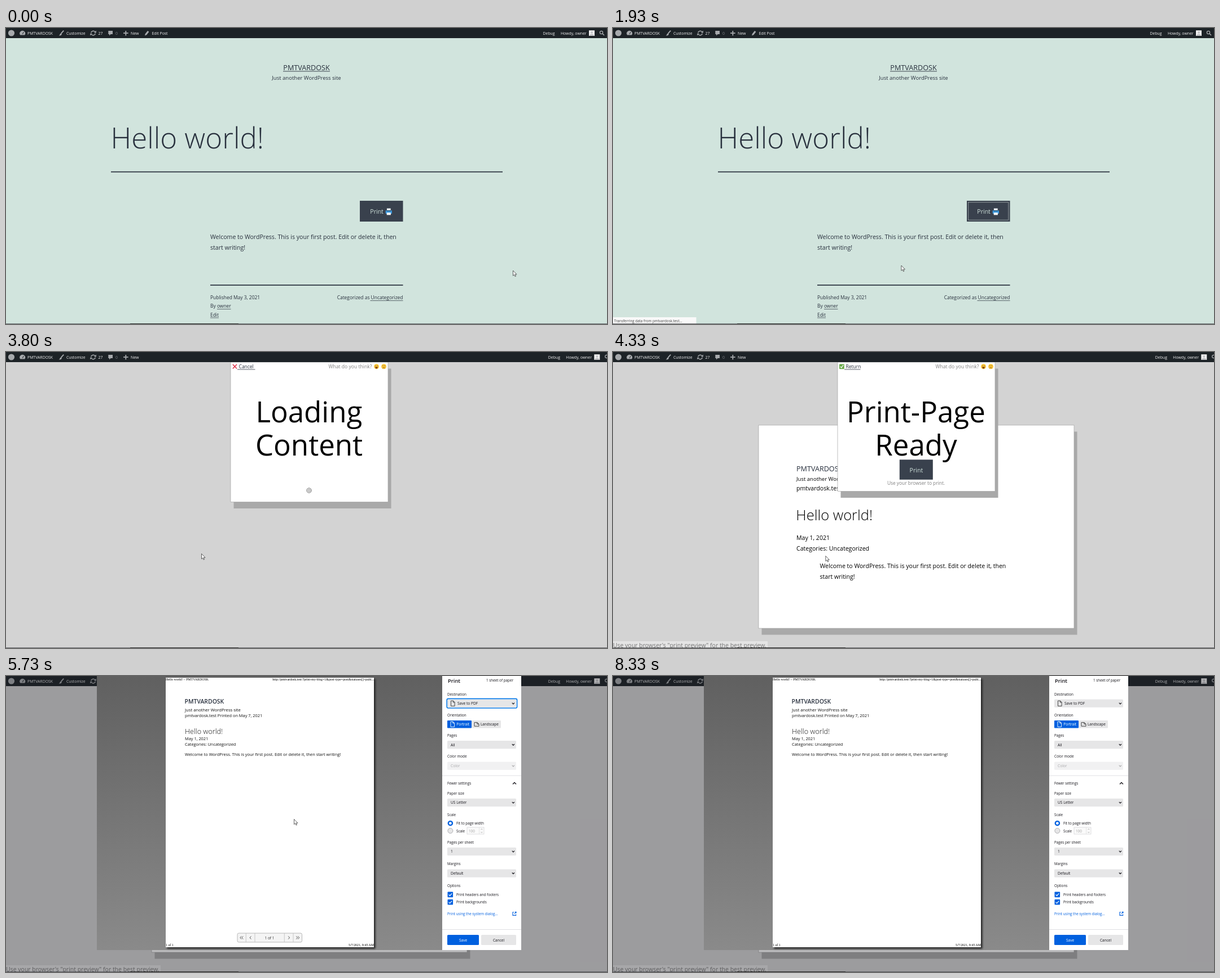
Recreate the animation shown at these times as an HTML page. Size 1065 by 526 pixels, loop 8.39 s.

```html
<!DOCTYPE html>
<html lang="en">
<head>
<meta charset="utf-8">
<title>Print preview demo</title>
<style>
html, body { margin: 0; width: 100%; height: 100%; overflow: hidden; background: #d3d3d3; }
svg { display: block; width: 1065px; height: 526px; font-family: "Open Sans", "Noto Sans", sans-serif; }
text { white-space: pre; }
</style>
</head>
<body>
<svg id="stage" viewBox="0 0 1065 526"></svg>
<script>
const LOOP = 8390;
const SITE = 'PMTVARDOSK', HOST = 'pmtvardosk.test', USER = 'owner';
const INK = '#28303d', BTN = '#39414d', MINT = '#d1e4dd', BLUE = '#0060df', DARK = '#15141a';
const WELCOME = 'Welcome to WordPress. This is your first post. Edit or delete it, then';
const BIG = 51, BODY = 10.57, SMALL = 8.45;

const text = (x, y, size, str, fill = INK, extra = '') =>
  `<text x="${x}" y="${y}" font-size="${size}" fill="${fill}" ${extra}>${str.replace(/&/g, '&amp;')}</text>`;
const rect = (x, y, w, h, fill, extra = '') =>
  `<rect x="${x}" y="${y}" width="${w}" height="${h}" fill="${fill}" ${extra}/>`;
const circle = (x, y, r, fill, extra = '') => `<circle cx="${x}" cy="${y}" r="${r}" fill="${fill}" ${extra}/>`;
const line = (d, color, width = 1, extra = '') =>
  `<path d="${d}" fill="none" stroke="${color}" stroke-width="${width}" ${extra}/>`;
const shape = (d, fill, extra = '') => `<path d="${d}" fill="${fill}" ${extra}/>`;
const group = (id, body, extra = '') => `<g ${id ? `id="${id}"` : ''} ${extra}>${body}</g>`;
const MID = 'text-anchor="middle"', END = 'text-anchor="end"', LIGHT = 'font-weight="300"';

// Top bar
const barText = (x, str, fill = '#f0f0f1') => text(x, 12.3, 6.9, str, fill);
const GREY = '#a7aaad';

function barLeft() {
  return rect(0, 0, 1065, 18, '#1d2327') +
    circle(9.5, 9, 5.6, GREY) +
    shape('M25.2 12.6A4.9 4.9 0 1 1 33.2 12.6Z', GREY) + line('M29.2 11L31.3 7', '#1d2327', 1) +
    barText(38, SITE) +
    line('M97.5 9.8L102.2 4.6', GREY, 1.8) + shape('M93.5 13.6Q95.5 13 95.7 10.6L97.6 9.6L98.9 11Q98 13.8 93.5 13.6Z', GREY) +
    barText(107, 'Customize') +
    line('M150.6 8.4A4 4 0 0 1 157.6 6.8M158.4 9.8A4 4 0 0 1 151.4 11.4', GREY, 1.5) +
    shape('M156 8.4H159.8V4.6ZM153 9.8H149.2V13.6Z', GREY) +
    barText(163.5, '27') +
    shape('M181.3 5H189V11H185.6L183 13.6V11H181.3Z', GREY) + barText(194, '0', '#80858a') +
    line('M212.3 5V13.4M208 9.2H216.6', GREY, 1.8) + barText(221, 'New');
}

function barRight(search) {
  return barText(951.5, 'Debug') + barText(983, 'Howdy, ' + USER) +
    rect(1033, 4.2, 10, 9.8, '#f1f1f1') +
    group('', circle(1038, 7.8, 1.9, '#c3c4c7') + shape('M1034 14Q1034 10.4 1038 10.4Q1042 10.4 1042 14Z', '#c3c4c7'),
      search ? '' : 'class="loaded"') +
    circle(1055, 8, 2.6, 'none', `stroke="${GREY}" stroke-width="1.3"`) + line('M1057 10L1060 13', GREY, 1.6);
}

// Printer icon on the print button
function printer(x, y) {
  return rect(x - 3.4, y - 6, 6.8, 5, '#e8eef2') + rect(x - 5.6, y - 2.6, 11.2, 6, '#3f9be0', 'rx="1"') +
    rect(x - 4, y - 2.6, 8, 1.6, '#25597f') + rect(x - 3.6, y + 1.6, 7.2, 4.2, '#f7f7f7');
}

function button(id, x, y, w, h, labelX, icon = '') {
  return group(id, rect(x, y, w, h, BTN, 'class="face"') + text(labelX, y + 23, BODY, 'Print', MINT, 'class="label"') + icon +
    rect(x + 2.7, y + 2.7, w - 5.4, h - 5.4, 'none', 'class="focus" stroke-width="1" stroke-dasharray="1 1"'));
}

const status = (id, str) => group(id, rect(0, 514, 147.5, 11.5, '#f9f9f9') + text(2, 522.6, 6.3, str, '#444'));

function blogPage() {
  return rect(0, 0, 1065, 526, MINT) + barLeft() +
    shape('M246 13.4L246.7 10.6L251 5L253.4 6.8L249.2 12.3Z', GREY) + barText(258.5, 'Edit Post') + barRight(true) +
    text(532.5, 75, 12.6, SITE, INK, MID) + rect(491, 76.5, 83, .9, INK) +
    text(532.5, 92, 9.52, 'Just another WordPress site', INK, MID) +
    text(185.5, 214, BIG, 'Hello world!', INK, LIGHT) +
    rect(186, 254.8, 694, 1.7, INK) +
    button('blogBtn', 627, 307, 76.5, 37, 645.3, printer(678.3, 326.5)) +
    text(362, 375, BODY, WELCOME) + text(362, 394.3, BODY, 'start writing!') +
    rect(362, 456, 341.5, 1.7, INK) +
    text(362, 482, SMALL, 'Published May 3, 2021') +
    text(362, 497.4, SMALL, 'By ' + USER) + rect(374, 499, 24.5, .7, INK) +
    text(362, 512.8, SMALL, 'Edit') + rect(362, 514.6, 15, .7, INK) +
    text(703.5, 482, SMALL, 'Categorized as Uncategorized', INK, END) + rect(645.5, 484, 58, .7, INK) +
    status('transfer', `Transferring data from ${HOST}...`);
}

// White card with a hard offset shadow
const card = (x, y, w, h) => rect(x + 5.5, y + 11.5, w, h, '#a9a9a9') +
  rect(x, y, w, h, '#fff', 'stroke="#a3a3a3" stroke-width=".7"');

const face = (x, mouth) => circle(x, 25.8, 4.5, '#fcc83c') + circle(x - 1.5, 24.6, .7, '#5d3c12') +
  circle(x + 1.5, 24.6, .7, '#5d3c12') + mouth;

function modalHead(action, end) {
  return text(412.6, 29.2, SMALL, action) + rect(410, 30.6, end - 410, .8, INK) +
    text(571.5, 29.2, 8.6, 'What do you think?', '#808080');
}
const faces = () =>
  face(656.5, shape('M654 26.6H659Q658.6 29.4 656.5 29.4Q654.4 29.4 654 26.6Z', '#7a3b12')) +
  face(669.5, line('M667.4 28.6Q669.5 26.4 671.6 28.6', '#7a4a12', .9));

const headline = (y, str) => text(537, y, BIG, str, '#000', MID);

function spinner(y) {
  return `<g transform="translate(537 ${y})">` +
    circle(0, 0, 4.3, '#e4e4e4', 'stroke="#888" stroke-width="1"') +
    circle(0, 0, 2, 'none', 'stroke="#999" stroke-width=".9"') +
    group('', circle(0, 2.4, 1.1, '#fff', 'stroke="#888" stroke-width=".5"'), 'class="spin"') + '</g>';
}

function waitPage() {
  const cross = line('M401.8 22L409 29.4M409 22L401.8 29.4', '#dd2e44', 1.5);
  const partial = circle(406, 26.3, 1.7, '#c8323e') +
    line('M655.3 28L658.6 24.6M668 28L671.3 24.6', '#e0a030', 1.7) +
    line('M657 27.6L659 25.8M669.8 27.6L671.6 25.8', '#6b4a18', .8);
  return group('init', card(398, 18, 279, 190) + headline(125, 'Initializing') + spinner(187)) +
    group('load', card(398, 18, 279, 248.5) + headline(125, 'Loading') + headline(184, 'Content') + spinner(246)) +
    modalHead('Cancel', 441.5) + group('partial', partial) + group('', cross + faces(), 'class="loaded"') +
    status('reading', 'Read s.w.org');
}

function readyPage() {
  return card(258, 130, 559, 361) +
    text(325, 212.3, 12.6, SITE) +
    text(325, 229, 9.52, 'Just another WordPress site', '#000') +
    text(325, 246.3, BODY, HOST + ' Printed on', '#000') +
    text(324.3, 299.3, 25.5, 'Hello world!', '#000', LIGHT) +
    text(325, 334, BODY, 'May 1, 2021', '#000') + text(325, 353.3, BODY, 'Categories: Uncategorized', '#000') +
    text(366.5, 383.6, BODY, WELCOME, '#000') + text(366.5, 402.6, BODY, 'start writing!', '#000') +
    card(398, 18, 279, 229.5) + modalHead('Return', 438.5) + faces() +
    rect(401, 21.4, 8.8, 8.8, '#6aab4c', 'rx="1"') + line('M402.8 25.8L404.8 28L408.2 23', '#fff', 1.3) +
    headline(125, 'Print-Page') + headline(184, 'Ready') +
    button('readyBtn', 507.8, 191.3, 59, 35.5, 525.6) +
    text(537, 236, 8.4, 'Use your browser to print.', '#808080', MID) +
    rect(0, 514, 274, 12, '#e4e4e4') +
    text(0, 524.6, 10.5, 'Use your browser\'s "print preview" for the best preview.', '#777');
}

// Browser print dialog
const label = (x, y, str, fill = DARK) => text(x, y, 6.3, str, fill);

function select(y, str, x = 788, off = false) {
  const color = off ? '#a9a9ab' : DARK;
  return rect(782, y, 122, 14.2, off ? '#f1f1f2' : '#e6e6e7', 'rx="1.5"') + text(x, y + 9.6, 6.6, str, color) +
    line(`M896.8 ${y + 6}L898.9 ${y + 8.2}L901 ${y + 6}`, color, 1.2);
}
const check = (y, str) => rect(782.5, y, 9.6, 9.6, BLUE, 'rx="1"') +
  line(`M784.6 ${y + 4.8}L786.6 ${y + 6.9}L790.2 ${y + 2.7}`, '#fff', 1.2) + label(798, y + 7.2, str);
const doc = (x, y, color) => line(`M${x} ${y}h4l2.6 2.6v6.8h-6.6zM${x + 3.8} ${y}v2.8h2.8`, color, .9);

function paper() {
  const p = (y, str, size = 7.4, extra = '') => text(317, y, size, str, '#111', extra);
  const edge = (x, y, str, extra = '') =>
    text(x, y, 5.9, str, '#000', `font-family="Liberation Serif, serif" ${extra}`);
  return rect(283, 3, 369, 479, '#fff', 'filter="url(#drop)"') +
    edge(283, 8, `Hello world! – ${SITE}`) +
    edge(652, 8, `http://${HOST}/?print-my-blog=1&post-type=post&statuses[]=publ...`, END) +
    text(316.6, 48.6, 10.4, SITE, INK, 'font-weight="600"') +
    p(62.6, 'Just another WordPress site', 7.7) + p(72.8, HOST + ' Printed on May 7, 2021') +
    p(103, 'Hello world!', 12.6, LIGHT) + p(113.6, 'May 1, 2021') + p(123.8, 'Categories: Uncategorized') +
    p(141.8, WELCOME + ' start writing!') +
    edge(283, 480, '1 of 1') + edge(652, 480, '5/7/2021, 9:45 AM', END);
}

function pager() {
  const arrow = (x, dir) => `M${x} 462.4l${dir * 2.4} 2.6l${-dir * 2.4} 2.6`;
  return rect(410, 457, 114.5, 16, '#f4f4f4', 'rx="2.5" stroke="#a8a8a8" stroke-width=".8"') +
    line('M425.3 457V473M441 457V473M493.3 457V473M509 457V473', '#bdbdbd', .8) +
    line([arrow(417.2, -1), arrow(420.2, -1), arrow(434.4, -1), arrow(500.2, 1), arrow(514.3, 1), arrow(517.3, 1)].join(''), '#444', .9) +
    text(467, 467.5, 6.5, '1 of 1', '#333', MID);
}

function dialog() {
  return rect(0, 0, 1065, 526, 'rgba(28,27,34,.3)') +
    rect(161, 0, 612, 487, 'url(#desk)') + paper() + group('pager', pager()) +
    rect(773, 0, 140, 487, '#fff') +
    text(783, 11.6, 9.4, 'Print', DARK, 'font-weight="600"') +
    text(899, 10.4, 6.3, '1 sheet of paper', DARK, END) +
    label(782, 34.6, 'Destination') + select(41.6, 'Save to PDF', 800) + doc(788.5, 44, '#333') +
    rect(781.2, 40.4, 124.4, 16.6, 'none', 'id="ring" rx="2.5" stroke="#0a7be8" stroke-width="1.6"') +
    label(782, 72.2, 'Orientation') +
    rect(782, 79, 43, 13.4, BLUE, 'rx="1"') + doc(788, 81, '#fff') + text(798.3, 88.2, 6.5, 'Portrait', '#fff') +
    rect(825, 79, 52, 13.4, '#e6e6e7', 'rx="1"') +
    line('M830 82.6h5l3 2.6v4h-8zM834.8 82.6v2.8h3', '#333', .9) + text(841, 88.2, 6.4, 'Landscape', DARK) +
    label(782, 107.8, 'Pages') + select(115, 'All') +
    label(782, 145.4, 'Color mode') + select(152.6, 'Color', 788, true) +
    rect(773, 176.6, 140, .8, '#d7d7db') +
    label(782, 193, 'Fewer settings') + line('M898 192.2L901 189.2L904 192.2', DARK, 1.3) +
    label(782, 211, 'Paper size') + select(217.8, 'US Letter') +
    label(782, 248.6, 'Scale') +
    circle(787.4, 261.7, 3.6, '#fff', `stroke="${BLUE}" stroke-width="2.4"`) + label(798, 264.2, 'Fit to page width') +
    circle(787.4, 275, 4.5, '#e6e6e7', 'stroke="#a0a0a4" stroke-width=".8"') + label(798, 277.6, 'Scale') +
    rect(817, 269, 30, 12, '#fafafa', 'stroke="#d0d0d3" stroke-width=".7"') + label(820, 277.6, '100', '#a0a0a0') +
    line('M838.6 269V281', '#ddd', .7) + line('M841.4 273.2l1.5-1.6l1.5 1.6M841.4 277l1.5 1.6l1.5-1.6', '#999', .7) +
    label(782, 298.2, 'Pages per sheet') + select(304.7, '1') +
    label(782, 335.8, 'Margins') + select(343.5, 'Default') +
    label(782, 375.4, 'Options') + check(383.6, 'Print headers and footers') + check(397, 'Print backgrounds') +
    label(782, 424.6, 'Print using the system dialog...', BLUE) +
    line('M900 419.8H898V425.4H903.6V423.4M901 422.4L903.8 419.4M901.6 419.2H904V421.6', BLUE, 1.1) +
    rect(773, 450, 140, .8, '#d7d7db') +
    rect(782, 460, 56, 18, BLUE, 'rx="1.5"') + text(810, 471.6, 6.5, 'Save', '#fff', MID) +
    rect(842, 460, 62, 18, '#e6e6e7', 'rx="1.5"') + text(873, 471.6, 6.5, 'Cancel', DARK, MID);
}

const stage = document.getElementById('stage');
stage.innerHTML =
  `<defs><linearGradient id="desk" x1="0" y1="0" x2="0" y2="1"><stop stop-color="#606060"/><stop offset="1" stop-color="#8a8a8a"/></linearGradient>
  <filter id="drop" x="-5%" y="-5%" width="110%" height="110%"><feDropShadow dx="2.5" dy="2.5" stdDeviation="1.8" flood-color="#202020"/></filter></defs>` +
  group('blog', blogPage()) +
  group('shell', rect(0, 0, 1065, 526, '#d3d3d3') + group('wait', waitPage()) + group('ready', readyPage()) +
    barLeft() + `<g transform="translate(9.3 0)">${barRight(false)}</g>`) +
  group('dialog', dialog()) +
  rect(0, 525.2, 1065, .8, '#4a4d50') + rect(220, 525, 192, 1, '#222') +
  group('cursor', shape('M0 0V9.2L2.1 7.3L3.6 10.6L5 10L3.6 6.8H6.5Z', '#fff', 'stroke="#222" stroke-width=".7"'));

const $ = id => document.getElementById(id);
const show = (el, on) => { el.style.display = on ? '' : 'none'; };

// Pointer way points: time, x, y
const PATH = [
  [0, 898.5, 431], [70, 898.5, 431], [470, 355, 401], [870, 648, 345], [1070, 664, 326], [1400, 665, 326],
  [1730, 550, 413], [1930, 511, 422], [2000, 498, 422], [2600, 342, 349], [3000, 335, 340], [3470, 336, 346],
  [3800, 346.5, 358.5], [3930, 367, 367], [4270, 367, 367], [4730, 557.5, 279], [4930, 557.5, 279],
  [5330, 524.5, 208.5], [5610, 524.5, 208.5], [5730, 510.5, 254.5], [6200, 496.5, 279], [7070, 496.5, 279],
  [7600, 122, 503]
];

function pointer(t) {
  const i = PATH.findIndex(p => p[0] > t);
  if (i < 0) return PATH[PATH.length - 1].slice(1);
  const [a, b] = [PATH[i - 1], PATH[i]];
  const k = (t - a[0]) / (b[0] - a[0]), e = k * k * (3 - 2 * k);
  return [a[1] + (b[1] - a[1]) * e, a[2] + (b[2] - a[2]) * e];
}

function paintButton(id, box, [x, y], focused) {
  const hover = x >= box[0] && x <= box[2] && y >= box[1] && y <= box[3];
  const el = $(id), surface = el.querySelector('.face'), focus = el.querySelector('.focus');
  surface.setAttribute('fill', hover ? 'none' : BTN);
  surface.setAttribute('stroke', hover ? INK : 'none');
  surface.setAttribute('stroke-width', 1.7);
  el.querySelector('.label').setAttribute('fill', hover ? BTN : MINT);
  focus.setAttribute('stroke', hover ? INK : '#e6f0ec');
  show(focus, focused);
}

function render(ms) {
  const t = Math.floor((ms + 4) * .015) / .015;
  const pos = pointer(t);
  show($('blog'), t < 1990);
  show($('shell'), t >= 1990);
  show($('wait'), t < 3860);
  show($('ready'), t >= 3860);
  show($('dialog'), t >= 5660);
  show($('transfer'), t >= 1590);
  show($('reading'), t < 2460);
  show($('init'), t < 2990);
  show($('load'), t >= 2990);
  show($('partial'), t < 2260);
  document.querySelectorAll('.loaded').forEach(el => show(el, t >= 2260));
  document.querySelectorAll('.spin').forEach(el => el.setAttribute('transform', `rotate(${t * .45 % 360})`));
  paintButton('blogBtn', [627, 307, 703.5, 344], pos, t >= 1320);
  paintButton('readyBtn', [508, 191, 567, 227], pos, t >= 5320);
  show($('pager'), t < 8130);
  $('pager').setAttribute('opacity', t >= 8060 ? .5 : 1);
  show($('ring'), t < 8330);
  show($('cursor'), t < 7595);
  $('cursor').setAttribute('transform', `translate(${pos[0]} ${pos[1]})`);
}

const start = performance.now();
function tick() {
  render((performance.now() - start) % LOOP);
  requestAnimationFrame(tick);
}
tick();
</script>
</body>
</html>
```
